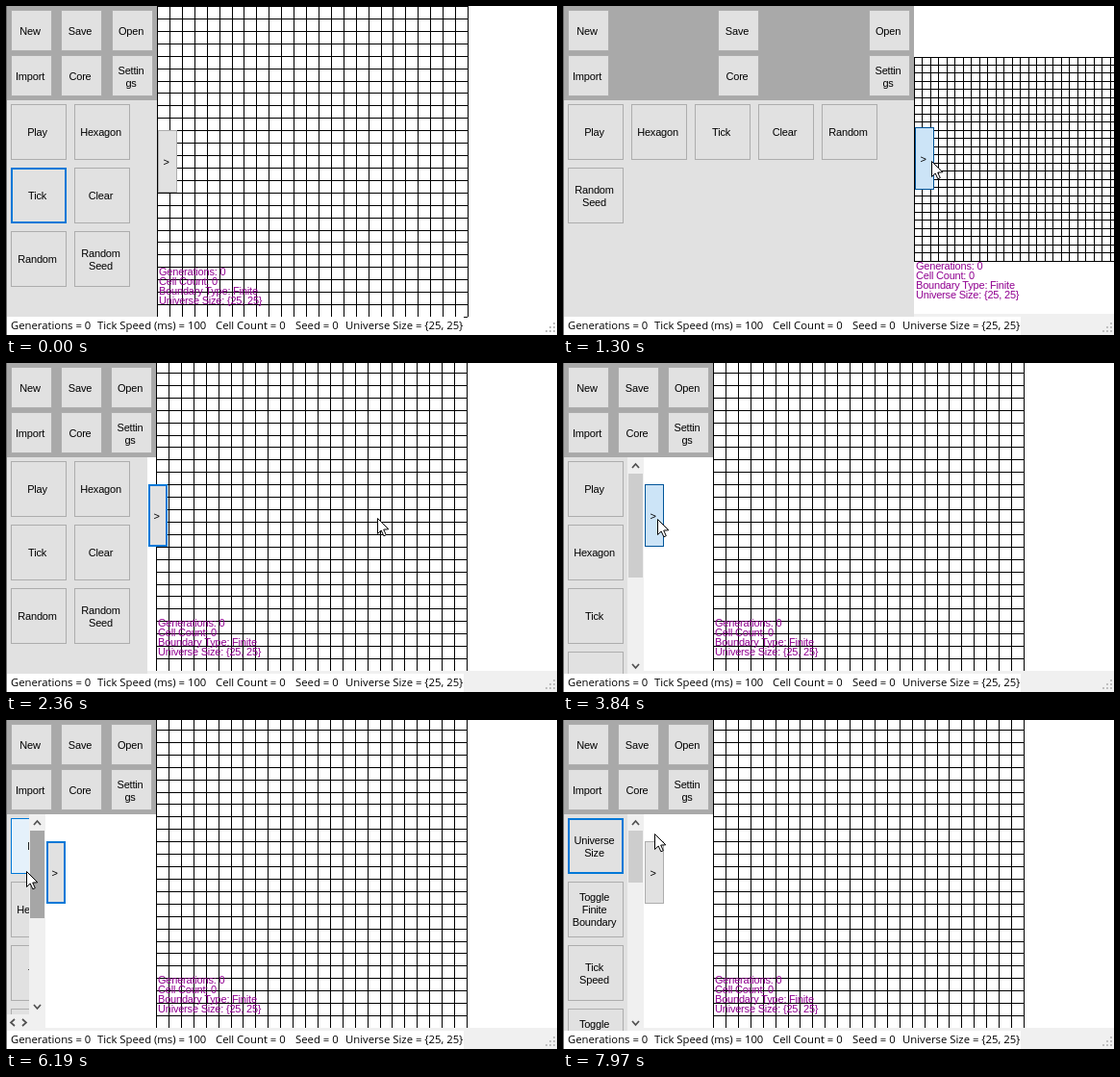
These frames come from a looping animation (573 px wide and 342 px high, 8 s). An HTML page with a canvas:

```html
<!DOCTYPE html>
<html lang="en">
<head>
<meta charset="utf-8">
<title>Game of Life panel</title>
<style>
html, body { margin: 0; width: 100%; height: 100%; overflow: hidden; background: #fff; }
canvas { display: block; }
</style>
</head>
<body>
<canvas id="stage" width="573" height="342"></canvas>
<script>
const ctx = document.getElementById('stage').getContext('2d');
const LOOP = 8000;
const PITCH = 66;
const UI_FONT = '11px "Liberation Sans", Arial, sans-serif';
const STATUS_FONT = '11.3px "Open Sans", "Noto Sans", sans-serif';

const TOP = [['New', 'Save', 'Open'], ['Import', 'Core', 'Settin|gs']];
const MAIN = ['Play', 'Hexagon', 'Tick', 'Clear', 'Random', 'Random|Seed'];
const SETTINGS = ['Universe|Size', 'Toggle|Finite|Boundary', 'Tick|Speed', 'Toggle|Grid|Lines'];
const SETTINGS_COUNT = 12;
const HUD = ['Generations: 0', 'Cell Count: 0', 'Boundary Type: Finite', 'Universe Size: {25, 25}'];
const STATUS = [
  [5, 'Generations = 0'], [95, 'Tick Speed (ms) = 100'], [218, 'Cell Count = 0'],
  [301, 'Seed = 0'], [353, 'Universe Size = {25, 25}']
];
const ARROW = [[0, 0], [0, 16], [3.7, 12.5], [6.4, 18.3], [8.8, 17.2], [6.2, 11.6], [11.3, 11.3]];

// Pointer moves: start, end, x, y; the second and the next pair drag the handle
const MOVES = [
  [340, 860, 170, 163], [938, 1327, 386, 161], [2365, 2800, 98, 162],
  [3840, 4600, 62, 162], [4690, 5010, 55, 162], [5790, 6150, 21, 157],
  [6210, 6520, 125, 70], [7550, 7790, 44, 123], [7940, 7970, 95, 118]
];

const progress = (t, a, b) => Math.min(1, Math.max(0, (t - a) / (b - a)));

function glide(t, a, b) {
  const p = progress(t, a, b);
  return p * p * (3 - 2 * p);
}

function panelWidth(t) {
  const opened = 216 * glide(t, 953, 1342);
  const collapsed = 288 * (1 - (1 - progress(t, 1780, 2640)) ** 1.35);
  const narrowed = 36 * glide(t, 3840, 4600) + 7 * glide(t, 4690, 5010);
  const restored = 43 * glide(t, 6750, 7150);
  return Math.round((t < 310 ? 157 : 156) + opened - collapsed - narrowed + restored);
}

function pointerAt(t) {
  return MOVES.reduce(([px, py], [a, b, x, y]) => {
    const k = glide(t, a, b);
    return [px + (x - px) * k, py + (y - py) * k];
  }, [330, 240]).map(Math.round);
}

function focusAt(t) {
  if (t < 880) return 'Tick';
  if (t < 6640) return '>';
  return t < 7550 ? 'Settin|gs' : 'Universe|Size';
}

function pressedAt(t) {
  if ((t >= 880 && t < 1500) || (t >= 3840 && t < 5010)) return '>';
  return t >= 6640 && t < 6720 ? 'Settin|gs' : '';
}

function fill(color, x, y, w, h) {
  ctx.fillStyle = color;
  ctx.fillRect(x, y, w, h);
}

function write(text, x, y, font = UI_FONT, color = '#000', align = 'left') {
  ctx.font = font;
  ctx.letterSpacing = font === UI_FONT ? '-0.2px' : '0px';
  ctx.fillStyle = color;
  ctx.textAlign = align;
  ctx.fillText(text, x, y);
}

function clipped(x, y, w, h, draw) {
  ctx.save();
  ctx.beginPath();
  ctx.rect(x, y, w, h);
  ctx.clip();
  draw();
  ctx.restore();
}

function button(s, label, x, y, w, h, hover = true) {
  const inside = s.px >= x && s.px < x + w && s.py >= y && s.py < y + h;
  const held = s.pressed === label;
  let face = '#e1e1e1', edge = '#adadad', line = 1;
  if (held && inside) { face = '#cce4f7'; edge = '#005499'; }
  else if (held || (hover && inside && !s.pressed)) { face = '#e5f1fb'; edge = '#0078d7'; }
  else if (s.focus === label) { edge = '#0078d7'; line = 2; }
  fill(edge, x, y, w, h);
  fill(face, x + line, y + line, w - 2 * line, h - 2 * line);
  const rows = label.split('|');
  rows.forEach((row, i) => {
    const mid = y + Math.ceil(h / 2) + (i - (rows.length - 1) / 2) * 13;
    write(row, x + w / 2 - 1.5, Math.round(mid) + 4, UI_FONT, '#000', 'center');
  });
}

function chevron(x, y, dx, dy) {
  ctx.beginPath();
  ctx.moveTo(x - 3.5 * dy - 2 * dx, y - 3.5 * dx - 2 * dy);
  ctx.lineTo(x + 2 * dx, y + 2 * dy);
  ctx.lineTo(x + 3.5 * dy - 2 * dx, y + 3.5 * dx - 2 * dy);
  ctx.strokeStyle = '#505050';
  ctx.lineWidth = 1.7;
  ctx.stroke();
}

function grid(s) {
  const size = Math.min(323, 577 - s.left);
  const top = 158.5 - size / 2 + s.drop;
  const lines = 25, cell = size / lines;
  clipped(s.left, 0, 573 - s.left, 321 + s.drop, () => {
    for (let i = 0; i <= lines; i++) {
      fill('#000', Math.round(s.left + i * cell), Math.round(top), 1, size);
      fill('#000', s.left, Math.round(top + i * cell), size, 1);
    }
    HUD.forEach((row, i) =>
      write(row, s.left + 2, 274 + 10 * i + 2 * s.drop, UI_FONT, '#900090'));
  });
}

function status(s) {
  if (!s.drop) fill('#f0f0f0', 0, 320, 573, 22);
  fill('#fff', 0, 323, 476, 19);
  STATUS.forEach(([x, text]) => write(text, x, 336, STATUS_FONT));
  for (let r = 0; r < 3; r++)
    for (let c = 0; c <= r; c++) fill('#bfbfbf', 569 - 4 * c, 329 + 4 * r, 2, 2);
}

function topPanel(s) {
  const w = s.left, size = 43;
  fill('#a9a9a9', 1, 0, w - 1, 98);
  const xs = [5, Math.round((w - size) / 2), w - 47];
  TOP.forEach((row, r) =>
    row.forEach((label, c) => button(s, label, xs[c], 4 + 47 * r, size, size)));
}

function scrollbars(s, across) {
  const x = s.width - 17, end = across ? 306 : 323;
  const content = PITCH * (s.settings ? SETTINGS_COUNT : MAIN.length);
  const thumb = Math.floor((end - 132) * (end - 98) / content);
  fill('#f0f0f0', x, 98, 17, 225);
  fill(s.thumbHot ? '#a6a6a6' : '#cdcdcd', x + 1, 115, 15, thumb);
  chevron(x + 8.5, 107, 0, -1);
  chevron(x + 8.5, end - 8, 0, 1);
  if (across) {
    fill('#f0f0f0', 1, 306, s.width - 1, 17);
    chevron(7, 314.5, -1, 0);
    chevron(x - 5, 314.5, 1, 0);
  }
}

function sidePanel(s) {
  const scroll = s.width < 2 * PITCH + 1, across = s.width < 84;
  const cols = scroll ? 1 : Math.floor((s.width - 1) / PITCH);
  const hover = !s.settings && (!scroll || s.px < s.width - 17);
  clipped(1, 98, s.width - 1, 225, () => {
    fill('#e1e1e1', 1, 98, s.width, 225);
    (s.settings ? SETTINGS : MAIN).forEach((label, i) => {
      const x = 5 + PITCH * (i % cols), y = 102 + PITCH * Math.floor(i / cols);
      button(s, label, x, y, 58, 58, hover);
    });
    if (scroll) scrollbars(s, across);
  });
}

function pointer(x, y) {
  ctx.beginPath();
  ARROW.forEach(([dx, dy]) => ctx.lineTo(x + 0.5 + dx, y + 0.5 + dy));
  ctx.closePath();
  ctx.fillStyle = '#fff';
  ctx.fill();
  ctx.strokeStyle = '#000';
  ctx.lineWidth = 1;
  ctx.stroke();
}

function draw(t) {
  const shown = t >= 330;
  const width = panelWidth(t);
  const [px, py] = shown ? pointerAt(t) : [-99, -99];
  const s = {
    width, px, py,
    left: Math.max(156, width),
    drop: t < 310 ? 3 : 0,
    focus: focusAt(t),
    pressed: pressedAt(t),
    settings: t >= 6720,
    thumbHot: t >= 5850 && t < 6400
  };
  fill('#fff', 0, 0, 573, 342);
  grid(s);
  status(s);
  button(s, '>', width + 1, 126 + s.drop, 20, 65);
  topPanel(s);
  sidePanel(s);
  fill('#707070', 0, 0, 1, 342);
  if (shown) pointer(px, py);
}

function frame() {
  draw(performance.now() % LOOP);
  requestAnimationFrame(frame);
}
frame();
</script>
</body>
</html>
```
